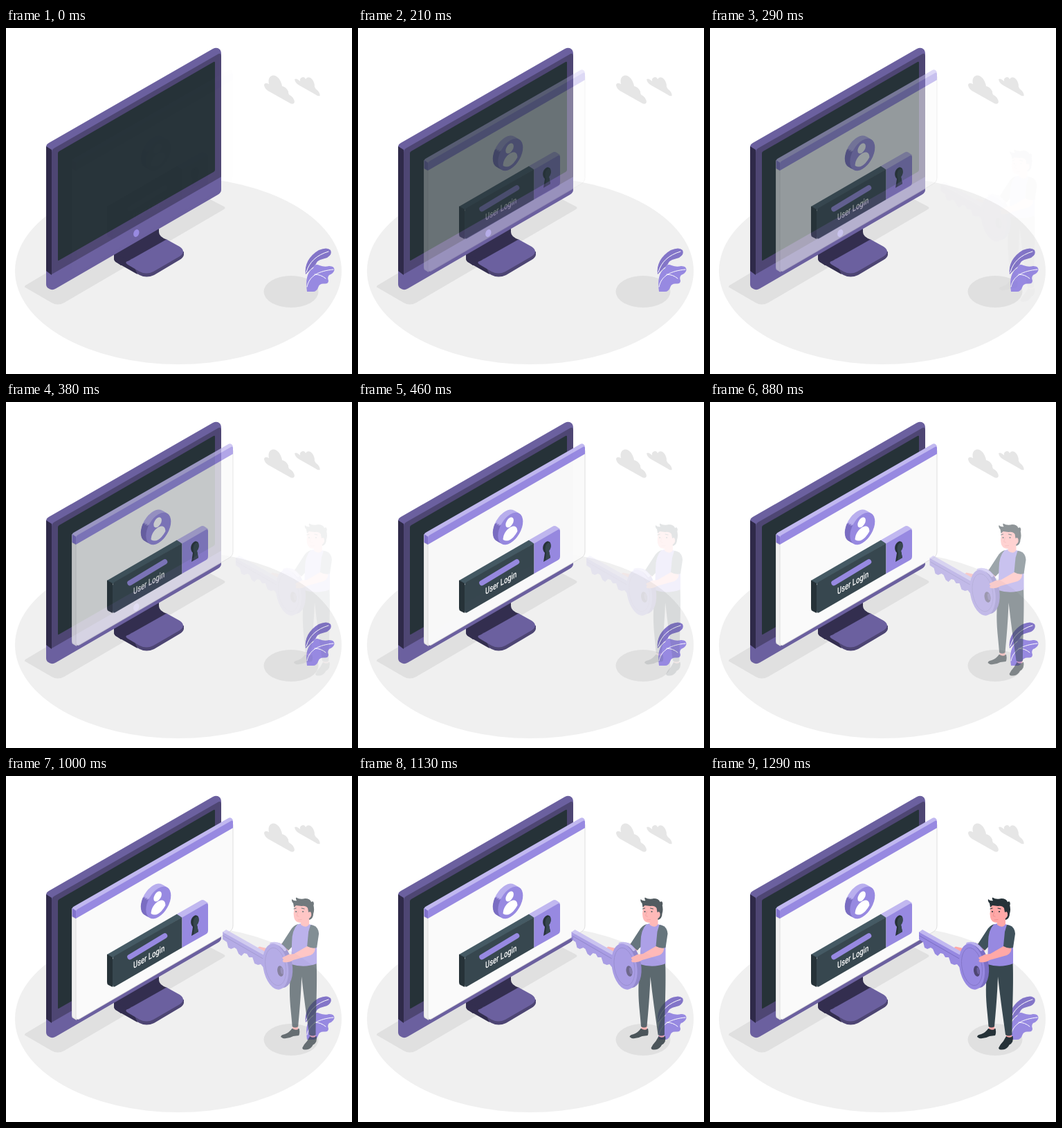
An HTML page for the animation above (1330 ms loop, 500 by 500 pixels).

```html
<!DOCTYPE html>
<html lang="en">
<head>
<meta charset="utf-8">
<title>User login</title>
<style>
  html, body { margin: 0; height: 100%; overflow: hidden; background: #fff; }
  svg { display: block; width: 100vw; height: 100vh; }
  .lilac { fill: #9789e1; }
  .pale { fill: #c1b8f0; }
  .plum { fill: #6b609f; }
  .slate { fill: #37474f; }
  .sleeve { fill: #3f525c; }
  .ink { fill: #263238; }
  .skin { fill: #ffa8a7; }
  .grey { fill: #e0e0e0; }
  .line { fill: none; stroke-linecap: round; stroke-linejoin: round; }
  text { font: 500 13.5px Roboto, sans-serif; fill: #fff; }
</style>
</head>
<body>
<svg viewBox="0 0 500 500">
  <defs>
    <linearGradient id="rim" x1=".2" y1=".75" x2=".45" y2="0">
      <stop offset=".56" stop-color="#7a6dc2"/>
      <stop offset=".62" stop-color="#b9afee"/>
    </linearGradient>
    <ellipse id="disc" rx="20.8" ry="20.8" transform="matrix(.866 -.5 0 1 220.3 183)"/>
  </defs>

  <ellipse cx="249" cy="351" rx="236" ry="135" fill="#f0f0f0"/>
  <path class="grey" d="M28 372L60 353 290 245 315 258Q318 260 315 262L84 397Q75 402 66 397L28 375Q26 374 28 372Z"/>
  <ellipse class="grey" cx="412" cy="381" rx="39.500" ry="23"/>

  <g id="clouds" fill="#e6e6e6">
    <path d="M373 82Q374 78 380 81C378 73 382 68 387 68.500C393 69 398 77 399 84Q405 85 408 92Q408 96 410 97Q416 100 417 107Q416 111 411 109L379 91Q373 87 373 82Z"/>
    <path d="M417 74Q420 72 425 77Q424 72 429 71Q432 71 433 74Q435 70 440 72Q446 76 446 85Q447 88 450 90Q454 94 453.500 98Q451 99 447 96L424 83Q418 80 417 74Z"/>
  </g>

  <g id="plant">
    <path fill="#8375c8" d="M433 356C431 342 438 329 452 321Q464 316 469 321Q472 327 464 332L454 335Q449 337 448 341Q445 345 442 347Z"/>
    <path class="lilac" d="M435 381C433 366 434 353 444 347Q446 340 453 343Q460 346 467 344Q475 344 474.500 350Q473 355 467 357Q464 360 466 365Q466 370 460 369.500Q453 369 451.500 374Q449 382 442 381Z"/>
    <path class="line" stroke="#fff" d="M434 353C438 338 449 328 466 323M435 374C438 358 452 351 473 349M446 356Q455 356 462 362"/>
  </g>

  <g id="monitor">
    <path fill="#332e4f" d="M156 326L221 288V295Q221 302 233 306L182 338 166 343 159 338Q156 336 156 332Z"/>
    <path fill="#4d4573" d="M165 336L257 323V328Q256 332 251 335L214 357Q203 362 193 357L160 338Z"/>
    <path fill="#332e4f" d="M156 328L180 334 190 356 160 339Q156 337 156 333Z"/>
    <path class="plum" d="M232 305.500L251 316Q261 323 251 330L213 352Q203 357 193 352L176 342Q170 338 177 336.500Z"/>
    <path class="plum" d="M58 172Q58 168 62 166L299 30Q305 27 309 31Q311 33 311 38V234Q311 238 306 241L72 376.500Q66 380 61 376Q58 374 58 370Z"/>
    <path fill="#2f2a49" d="M58 171L66 176V357L58 351Z"/>
    <path fill="#4e4673" d="M66 180Q66 176 69 174L306 38Q311 35 311 42V215L66 356Z"/>
    <path class="ink" d="M75 181Q75 179 77 178L300 49Q302 48 302 50V205Q302 207 300 208L77 335.500Q75 337 75 335Z"/>
    <ellipse class="lilac" cx="188.300" cy="296.500" rx="3.900" ry="5.600" transform="rotate(22 188.300 296.500)"/>
  </g>

  <g id="panel">
    <path class="grey" d="M95 191L102 194V353L97 350Q95 349 95 346Z"/>
    <path fill="#fafafa" stroke="#dcdcdc" stroke-width=".9" d="M101 200L328 70V216Q328 222 323 225L106 351Q101 353 101 348Z"/>
    <path fill="#f0f0f0" d="M96 204L100.500 207V351L96 348Z"/>
    <path class="pale" d="M95.500 192Q96 189 99 188L322 60.500Q326 59 328 64L101 196Z"/>
    <path class="lilac" d="M101 196Q101 193.500 104 192L325 65Q328 63 328 66V75L101 206Z"/>
    <path fill="#8173cc" d="M95.500 191L101 194.500V206L95.500 203Z"/>

    <g fill="url(#rim)">
      <use href="#disc" x="-7.500" y="-4.300"/>
      <use href="#disc" x="-5" y="-2.900"/>
      <use href="#disc" x="-2.500" y="-1.500"/>
    </g>
    <use href="#disc" class="lilac"/>
    <g fill="#fff" transform="matrix(.866 -.5 0 1 220 183)">
      <circle cx="-1" cy="-9.500" r="6.700"/>
      <path d="M-12 10C-12 -6 12 -6 12 10Q6 16 0 16T-12 10Z"/>
    </g>

    <path fill="#455a64" d="M146 258L247 199.500 255 204 154 263Z"/>
    <path class="ink" d="M146 257.500L154 262V305L148 302Q146 301 146 298Z"/>
    <path class="slate" d="M154 265Q154 262 157 260L254.500 204V248L158 304Q154 306 154 302Z"/>
    <path class="pale" d="M247 199.500L281 180Q284 178 287 180L292 183.500 255 205Z"/>
    <path class="lilac" d="M254.500 204.500L289 184.500Q292 183 292 186V223Q292 227 289 228.500L254.500 248Z"/>
    <path class="ink" d="M268 231L270 218C265 213 267 204 273 201.500C280 200 280 211 276 215L278 225Z"/>
    <path class="slate" d="M271 229L272 218C269 212 271 204 276 203C280 205 279 212 276 215L278 225Z"/>
    <path class="line" stroke="#9789e1" stroke-width="7.500" d="M179 261.500L229.500 231"/>
    <text transform="matrix(.7 -.4 0 1 184 278.500)">User Login</text>
  </g>

  <g id="man">
    <path class="ink" d="M386 377Q386 374 392 373Q399 370 402 365H412.500Q414 371 412 375L404 376Q397 380 389 379ZM417 393Q420 387 424 383L428 376H437.500Q439 383 435 387Q432 388 431 391Q426 397 418 395Z"/>
    <path class="skin" d="M403 358H411V366Q407 368 403 365ZM428 370H436V377Q431 379 428 376Z"/>
    <path class="slate" d="M400 268H437.500C439 300 436.500 345 436.500 374Q432 377 427 374C423 345 419 318 416 290C415 318 413 340 411 362Q407 365 402.500 362C401 340 398 325 399 300Z"/>
    <path class="skin" d="M387 242L399 250 391 258Q372 257 354 252Q350 249 355 246.500L366 249 379 251Z"/>
    <path class="sleeve" d="M411 214Q404 216 400 223L387 243 397 252 403 246 408 226Z"/>
    <path class="lilac" d="M410 214.500Q420 211 433 216L438 222V271Q420 278 401 272L402 240Q402 223 410 214.500Z"/>

    <g id="head">
      <path class="skin" d="M415 204L427 200V214Q423 221 415 215Z"/>
      <path class="ink" d="M424 188L433 186Q435 193 433 199Q433 206 427 208Z"/>
      <path class="skin" d="M406 186L425 184 426 195Q431 196 430 202Q428 206 426 206Q422 212 414 212Q406 211 405 204L404.500 199Z"/>
      <path class="ink" d="M405 190L404 184Q401 181 402 178Q405 181 409 180Q407 178 408 175.500Q414 179 421 177Q428 177 430 182Q433 180 433.500 183Q434.500 186 432 188L431 195 426 197 425 191Q422 187 416 188L408 187Z"/>
      <path class="line" stroke="#263238" stroke-width="1.100" d="M405 192L408 191M416 191L420 192"/>
      <path class="line" stroke="#f28f8f" d="M411 196L409 202 412 203M411 208L416 207.500"/>
      <circle class="ink" cx="408" cy="196" r="1.100"/>
      <circle class="ink" cx="418" cy="196" r="1.100"/>
    </g>

    <g id="key">
      <path class="lilac" d="M302 225L366 261V279L361 277 357 272 353 273 348 271 345 262 340 262 337 257 333 256 329 260 325 257 322 250 319 248 314 250 310 248 308 240 302 236Z"/>
      <path class="pale" d="M302 225.500L307 222 367 256 363 259.500Z"/>
      <path class="line" stroke="#7b6ec4" d="M303 231L362 265"/>
      <ellipse fill="#7b6ec4" cx="384.500" cy="273.500" rx="18" ry="33" transform="rotate(-10 384.500 273.500)"/>
      <path class="line" stroke="#b9afee" stroke-width="4" d="M372 242.500Q383 239 392 251"/>
      <ellipse class="lilac" cx="378.500" cy="275.500" rx="18" ry="33.500" transform="rotate(-10 378.500 275.500)"/>
      <ellipse class="line" stroke="#8375c8" stroke-width=".9" cx="378.500" cy="275.500" rx="14.500" ry="27.500" transform="rotate(-10 378.500 275.500)"/>
      <ellipse fill="#4e4673" cx="385.500" cy="282" rx="4.400" ry="7.800" transform="rotate(-10 385.500 282)"/>
      <ellipse fill="#6b609f" cx="387.500" cy="281.500" rx="2" ry="5" transform="rotate(-10 387.500 281.500)"/>
    </g>

    <path class="skin" d="M424 246L435 247Q437 255 429 259L404 266Q398 270 390 269Q387 267 390 265.500Q386 262 391 261L397 258 405 257Z"/>
    <path class="sleeve" d="M429 215Q440 216 441 228L438 248Q431 250 424 246L426 225Z"/>
  </g>
</svg>
<script>
  const LOOP = 1330, STEP = 41.6, SLIDE = 32;
  const panel = document.getElementById('panel');
  const man = document.getElementById('man');

  const ease = (t, start, length) =>
    Math.min(1, Math.max(0, (t - start) / length)) ** 1.3;

  // The picture advances in even steps, after a double-length first hold.
  function draw(now) {
    const t = Math.max(1, Math.floor((now % LOOP + 5) / STEP)) * STEP;
    const arrival = ease(t, 250, 1040);
    panel.setAttribute('opacity', ease(t, 30, 430));
    man.setAttribute('opacity', arrival);
    man.setAttribute('transform', `translate(${(1 - arrival) * SLIDE} 0)`);
  }

  const start = performance.now();
  function tick() {
    draw(performance.now() - start);
    requestAnimationFrame(tick);
  }
  tick();
</script>
</body>
</html>
```
